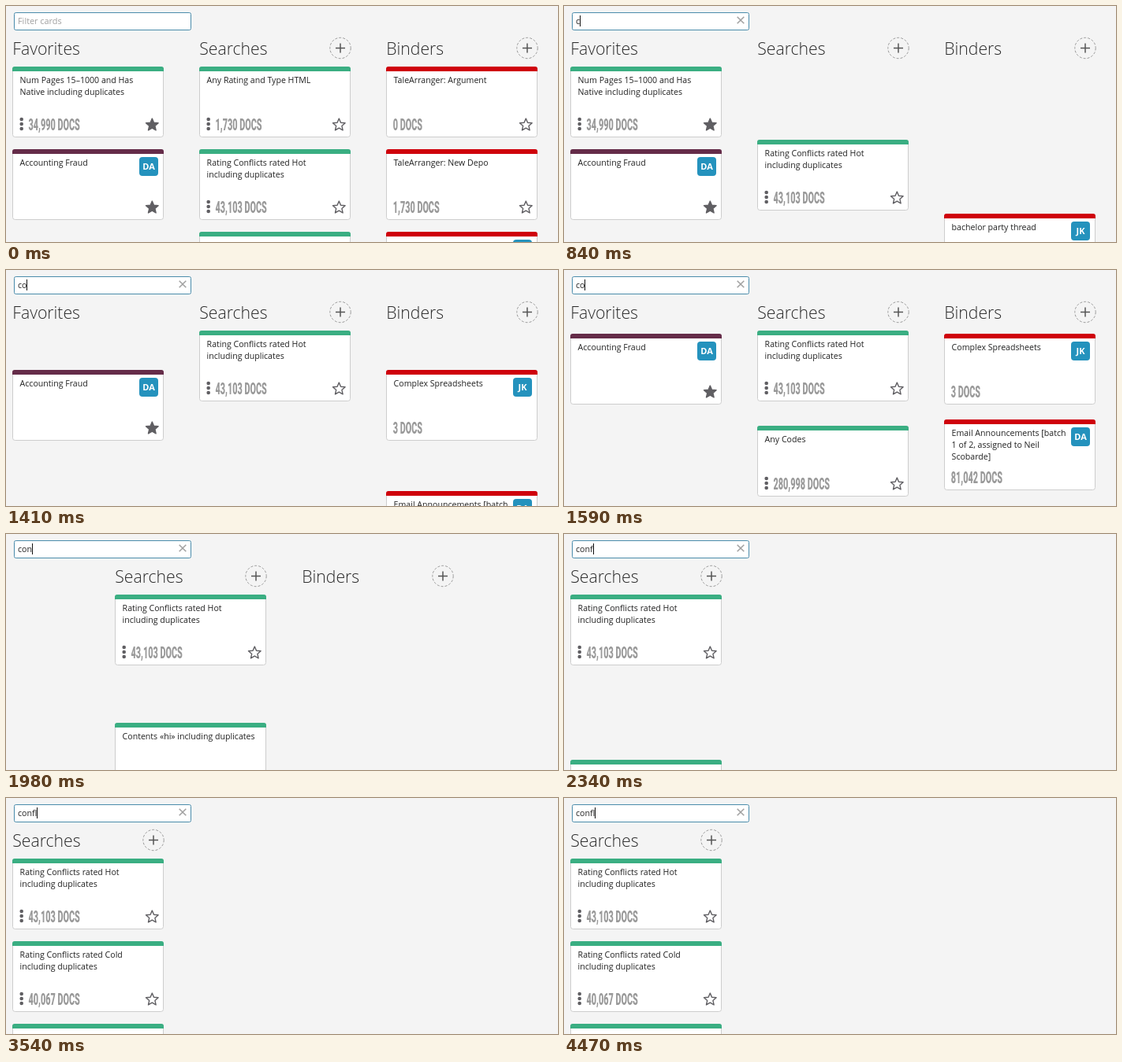
Recreate the animation shown at these times as an HTML page. Size 700 px wide and 300 px high, loop 4500 ms.

```html
<!DOCTYPE html>
<html lang="en">
<head>
<meta charset="utf-8">
<title>Card filter</title>
<style>
  html, body { margin: 0; width: 100%; height: 100%; overflow: hidden; background: #f4f4f4; }
  svg { display: block; width: 700px; height: 300px; }
  text { font-family: "Open Sans", sans-serif; font-size: 10.6px; fill: #222; }
  .head { font-size: 21.2px; font-weight: 300; fill: #2b2b2b; }
  .docs { font-family: Roboto, sans-serif; font-size: 19.7px; font-weight: 900; fill: #999; }
  .badge { font-size: 11px; font-weight: 700; fill: #fff; text-anchor: middle; }
  .hint { font-size: 10.9px; fill: #a0a0a0; }
</style>
</head>
<body>
<svg id="stage" viewBox="0 0 700 300"></svg>
<script>
const LOOP = 4500, MOVE = 400, DELAY = 40, BLINK = 500;
const COL_X = 8, COL_STEP = 237, ROW_Y = 77, ROW_STEP = 105;
const GREEN = '#3aae82', RED = '#cf000b', PLUM = '#652c49', BLUE = '#2492bd', GREY = '#605f63';

// Typed text and the time it appears
const keys = [
  { text: '', at: 290 },
  { text: 'c', at: 757 },
  { text: 'co', at: 1248 },
  { text: 'con', at: 1833 },
  { text: 'conf', at: 2300 },
  { text: 'confl', at: 3140 }
];

const search = (title, docs, star = 'open') => ({ title, docs, star, dots: true, color: GREEN });
const binder = (title, docs, badge) => ({ title, docs, badge, star: badge ? '' : 'open', color: RED });
const numPages = () => search('Num Pages 15–1000 and Has\nNative including duplicates', '34,990', 'full');

const columns = [
  { name: 'Favorites', cards: [
    numPages(),
    { title: 'Accounting Fraud', badge: 'DA', star: 'full', color: PLUM }
  ] },
  { name: 'Searches', plus: true, cards: [
    search('Any Rating and Type HTML', '1,730'),
    search('Rating Conflicts rated Hot\nincluding duplicates', '43,103'),
    search('Any Type', '9,214'),
    numPages(),
    search('Any Custodian', '8,350'),
    search('Has Attachments', '5,102'),
    search('Responsive including duplicates', '2,416'),
    search('Any Codes', '280,998'),
    search('Contents «hi» including duplicates', '12,480'),
    search('Rating Conflicts rated Cold\nincluding duplicates', '40,067'),
    search('Rating Conflicts', '83,170')
  ] },
  { name: 'Binders', plus: true, cards: [
    binder('TaleArranger: Argument', '0'),
    binder('TaleArranger: New Depo', '1,730'),
    binder('bachelor party thread', '6', 'JK'),
    binder('Trial Exhibits', '14'),
    binder('Key Emails', '32'),
    binder('Complex Spreadsheets', '3', 'JK'),
    binder('Privilege Checks', '18'),
    binder('Email Announcements [batch\n1 of 2, assigned to Neil\nScobarde]', '81,042', 'DA'),
    binder('March Batch', '75'),
    binder('Case Files', '120'),
    binder('Corporate Filings', '41'),
    binder('Company Policies', '27'),
    binder('Contract Review', '212', 'JK')
  ] }
];

function add(parent, tag, attrs = {}, text) {
  const node = document.createElementNS('http://www.w3.org/2000/svg', tag);
  for (const k in attrs) node.setAttribute(k, attrs[k]);
  if (text !== undefined) node.textContent = text;
  parent.appendChild(node);
  return node;
}

function place(node, x, y) {
  node.setAttribute('transform', `translate(${Math.round(x)} ${Math.round(y)})`);
}

function show(node, on) {
  node.style.display = on ? '' : 'none';
}

function starPath(cx, cy, r) {
  const pts = [];
  for (let i = 0; i < 10; i++) {
    const a = i * Math.PI / 5, d = i % 2 ? r * 0.46 : r;
    pts.push((cx + d * Math.sin(a)).toFixed(2) + ',' + (cy - d * Math.cos(a)).toFixed(2));
  }
  return 'M' + pts.join('L') + 'Z';
}

function drawCard(parent, card) {
  const g = add(parent, 'g');
  add(g, 'rect', { x: 0.5, y: 0.5, width: 191, height: 89, rx: 3, fill: '#fff', stroke: '#cdcdcd' });
  add(g, 'path', { d: 'M0 6V3Q0 0 3 0H189Q192 0 192 3V6Z', fill: card.color });
  card.title.split('\n').forEach((line, i) => add(g, 'text', { x: 9.6, y: 21 + 15 * i }, line));
  if (card.badge) {
    add(g, 'rect', { x: 161, y: 10, width: 24, height: 24, rx: 4, fill: BLUE });
    add(g, 'text', { x: 173, y: 26, class: 'badge' }, card.badge);
  }
  if (card.dots) {
    for (const y of [67, 73, 79]) add(g, 'circle', { cx: 11.7, cy: y, r: 2.3, fill: GREY });
  }
  if (card.docs) {
    const x = card.dots ? 20.5 : 8.7;
    add(g, 'text', { class: 'docs', transform: `translate(${x} 80.5) scale(.55 1)` }, card.docs + ' DOCS');
  }
  if (card.star) {
    add(g, 'path', {
      d: starPath(177.3, 74.3, 8.2), fill: card.star === 'full' ? GREY : '#fff',
      stroke: GREY, 'stroke-width': 1.4, 'stroke-linejoin': 'round'
    });
  }
  return g;
}

function drawColumn(parent, col) {
  col.node = add(parent, 'g');
  add(col.node, 'text', { x: 0.3, y: 62, class: 'head' }, col.name);
  if (col.plus) {
    add(col.node, 'circle', {
      cx: 179, cy: 53.5, r: 13.2, fill: 'none', stroke: '#999', 'stroke-dasharray': '3 2'
    });
    add(col.node, 'path', { d: 'M173 53.5h12M179 47.5v12', stroke: '#555', 'stroke-width': 1.5 });
  }
  for (const card of col.cards) card.node = drawCard(col.node, card);
}

// Row of every card and slot of every column for each query; -1 means hidden
function rank(items, test) {
  let n = 0;
  return items.map(item => test(item) ? n++ : -1);
}

for (const { text } of keys) {
  const hit = card => card.title.toLowerCase().includes(text);
  for (const col of columns) {
    rank(col.cards, hit).forEach((row, i) => (col.cards[i].rows ||= []).push(row));
  }
  rank(columns, col => col.cards.some(hit)).forEach((slot, i) => (columns[i].slots ||= []).push(slot));
}

// Same curve as the CSS "ease" keyword
function ease(x) {
  if (x <= 0) return 0;
  if (x >= 1) return 1;
  let lo = 0, hi = 1;
  for (let i = 0; i < 24; i++) {
    const s = (lo + hi) / 2;
    if (0.75 * s * (1 - s) + s ** 3 < x) lo = s; else hi = s;
  }
  const s = lo, r = 1 - s;
  return 0.3 * s * r * r + 3 * s * s * r + s ** 3;
}

const stage = document.getElementById('stage');
add(stage, 'rect', { width: 700, height: 300, fill: '#f4f4f4' });
columns.forEach(col => drawColumn(stage, col));
add(stage, 'rect', { x: 10.5, y: 8.5, width: 224, height: 22, rx: 2, fill: '#fff', stroke: '#4a8cab' });
const hint = add(stage, 'text', { x: 15, y: 23, class: 'hint' }, 'Filter cards');
const typed = add(stage, 'text', { x: 15, y: 23 }, '');
const caret = add(stage, 'rect', { y: 12, width: 1, height: 14, fill: '#111' });
const clear = add(stage, 'path', { d: 'M219.7 13.7l8.6 8.6m0-8.6l-8.6 8.6', stroke: '#a0a0a0', 'stroke-width': 1.5 });

function stepAt(t) {
  let n = 0;
  while (n + 1 < keys.length && keys[n + 1].at <= t) n++;
  return n;
}

function drawField(t) {
  const { text, at } = keys[stepAt(t)];
  if (typed.textContent !== text) typed.textContent = text;
  show(hint, !text);
  show(clear, text);
  show(caret, Math.floor((t - at) / BLINK) % 2 === 0);
  caret.setAttribute('x', Math.round(15 + (text ? typed.getComputedTextLength() : 0)));
}

function drawCards(t) {
  const n = stepAt(t - DELAY), prev = Math.max(0, n - 1);
  const p = n ? ease((t - DELAY - keys[n].at) / MOVE) : 1;
  const between = list => list[prev] + (list[n] - list[prev]) * p;
  for (const col of columns) {
    show(col.node, col.slots[n] >= 0);
    if (col.slots[n] < 0) continue;
    place(col.node, COL_X + COL_STEP * between(col.slots), 0);
    for (const card of col.cards) {
      show(card.node, card.rows[n] >= 0);
      if (card.rows[n] >= 0) place(card.node, 0, ROW_Y + ROW_STEP * between(card.rows));
    }
  }
}

function draw(t) {
  drawField(t);
  drawCards(t);
}

const start = performance.now();
function tick(now) {
  draw(Math.max(0, now - start) % LOOP);
  requestAnimationFrame(tick);
}
draw(0);
requestAnimationFrame(tick);
</script>
</body>
</html>
```
